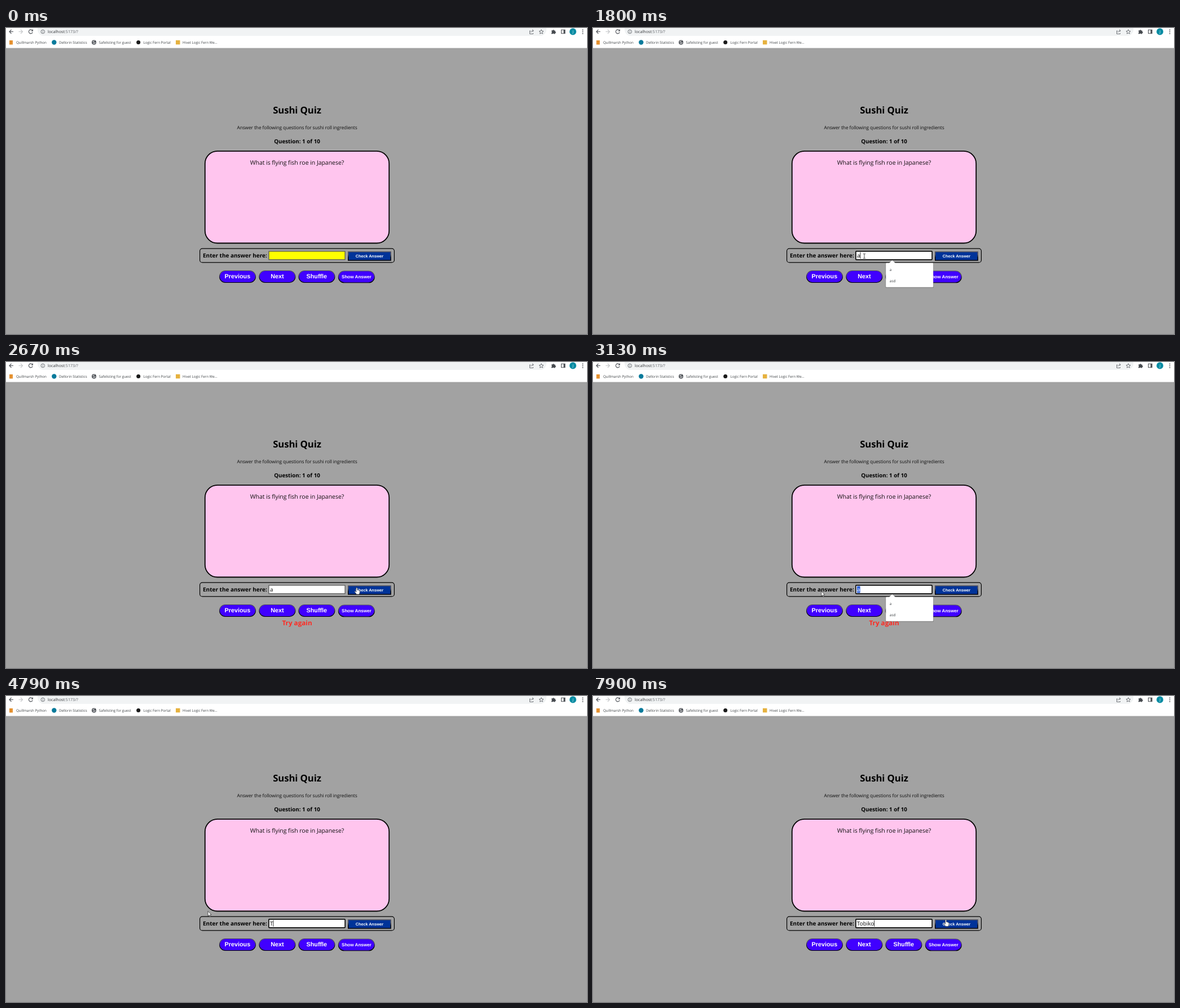
Animation, 1030 px wide and 544 px high, one loop 8000 ms. Source, as an HTML page:

```html
<!DOCTYPE html>
<html lang="en">
<head>
<meta charset="utf-8">
<title>Sushi Quiz</title>
<style>
  html, body { margin: 0; width: 100%; height: 100%; overflow: hidden; background: #a2a2a2; }
  svg { display: block; width: 100%; height: 100%; }
  text { font-family: "Open Sans", "Noto Sans", sans-serif; text-rendering: geometricPrecision; white-space: pre; }
  .mid { text-anchor: middle; }
  .bold { font-weight: 700; }
  .small { font-size: 6.2px; fill: #3c4043; }
  .button { font: 700 10.8px "Liberation Sans", Arial, sans-serif; fill: #fff; text-anchor: middle; }
  .pill { fill: #4000ff; stroke: url(#outset); stroke-width: 1.1; }
  .line { fill: none; stroke: #50545a; stroke-width: 1.1; }
  .field { font-size: 9.9px; }
</style>
</head>
<body>
<svg viewBox="0 0 1030 544">
  <defs>
    <linearGradient id="outset" x2="0" y2="1">
      <stop offset=".3" stop-color="#55535f"/><stop offset=".7" stop-color="#000"/>
    </linearGradient>
  </defs>

  <!-- Browser bar -->
  <rect width="1030" height="35.6" fill="#fff"/>
  <rect x="56" y="-10" width="902" height="24" rx="11" fill="#f1f3f4"/>
  <g class="line">
    <path d="M13 6.5H6M9.5 3 6 6.5 9.5 10"/>
    <path d="M22.500 6.500h7M26 3l3.500 3.500L26 10" stroke="#c4c6c9"/>
    <path d="M46.700 4.300A3.500 3.500 0 1 0 47.200 7.500M47.400 2.600v2.600h-2.600"/>
    <circle cx="65.300" cy="6.500" r="3.300" stroke-width=".8"/>
    <path d="M65.300 6v2.300M65.300 4.400v.8" stroke-width=".8"/>
    <path d="M930 5h-1.500v5.500h6V9M930.500 8c.3-2.400 2-3.200 4.500-3.200M933 2.700l2.300 2.100L933 7" stroke-width=".8"/>
    <path d="M949 2.800l1.100 2.600 2.800.2-2.100 1.900.6 2.700-2.400-1.400-2.400 1.400.6-2.700-2.100-1.900 2.800-.2z" stroke-width=".8"/>
    <path d="M984.500 3.300h6.500v6.400h-6.500z"/>
  </g>
  <path d="M967 4.500h2a1.300 1.300 0 0 1 2.600 0h2v2a1.300 1.300 0 0 1 0 2.600v1.400h-2.300a1.200 1.200 0 0 0-2.300 0h-2V8.400a1.200 1.200 0 0 0 0-2.300zM988.500 3.300h2.500v6.400h-2.500z" fill="#45494e"/>
  <circle cx="1005" cy="6.500" r="6" fill="#078ca3"/>
  <text class="mid" x="1005" y="8.800" font-size="6.500" fill="#fff">J</text>
  <g fill="#45494e">
    <circle cx="1022.500" cy="3.500" r=".9"/><circle cx="1022.500" cy="6.700" r=".9"/><circle cx="1022.500" cy="9.900" r=".9"/>
  </g>
  <text x="74" y="9.200" font-size="7.150" fill="#303236">localhost<tspan fill="#5f6368">:5173/?</tspan></text>

  <rect x="6" y="22" width="6" height="7.500" fill="#e59231"/>
  <circle cx="85.300" cy="25.500" r="4.200" fill="#087a9b"/>
  <circle cx="156" cy="25.500" r="4" fill="#4b4f54"/>
  <path d="M153.500 24.500c2 0 2-1.500 3.500-1.500M154 27c2-.5 3 .5 4.500-1" stroke="#fff" stroke-width="1.100" fill="none"/>
  <circle cx="234.700" cy="25.500" r="3.500" fill="#1a1a1a"/>
  <rect x="301" y="21.800" width="7.500" height="7.500" fill="#e6b23f"/>
  <g class="small">
    <text x="18" y="27.700">Quillmarsh Python</text>
    <text x="94" y="27.700">Dellorin Statistics</text>
    <text x="164.800" y="27.700">Safelisting for guest</text>
    <text x="243.500" y="27.700">Logic Fern Portal</text>
    <text x="313" y="27.700">Hivet Logic Fern We...</text>
  </g>

  <!-- Quiz -->
  <text class="mid bold" x="516" y="152" font-size="16.800" letter-spacing="-.12">Sushi Quiz</text>
  <text class="mid" x="516" y="179.600" font-size="8.400" letter-spacing="-.1" fill="#111">Answer the following questions for sushi roll ingredients</text>
  <text class="mid bold" x="516" y="204.600" font-size="9.800">Question: 1 of 10</text>
  <rect x="352.800" y="218.900" width="326.400" height="163.600" rx="22" fill="#ffc5ee" stroke="#000" stroke-width="1.800"/>
  <text class="mid" x="516" y="243" font-size="10.500" letter-spacing="-.04" fill="#111">What is flying fish roe in Japanese?</text>

  <rect x="343.600" y="392.100" width="344.800" height="24.800" rx="4.500" fill="none" stroke="#000" stroke-width="1.200"/>
  <text class="bold" x="349" y="408" font-size="10">Enter the answer here:</text>
  <rect id="input" x="466" y="397" width="135" height="14.800" stroke="#4a4a4a" stroke-width="1.100"/>
  <rect id="focusRing" x="465.800" y="396.800" width="135.400" height="15.200" rx="1.500" fill="none" stroke="#000" stroke-width="1.400"/>
  <rect id="selection" x="468" y="398.500" width="5.700" height="12" fill="#2f62d9"/>
  <text id="typed" class="field" x="468" y="408"></text>
  <rect id="caret" y="398.500" width=".8" height="11.500"/>

  <rect x="606.700" y="397.900" width="75.400" height="15.200" fill="#003399" stroke="url(#outset)" stroke-width="1.400"/>
  <text class="button" x="644.500" y="408" style="font-size:7.200px">Check Answer</text>

  <rect class="pill" x="378.500" y="431.500" width="64" height="21" rx="10.500"/>
  <rect class="pill" x="448.900" y="431.500" width="64" height="21" rx="10.500"/>
  <rect class="pill" x="518.900" y="431.500" width="64" height="21" rx="10.500"/>
  <rect class="pill" x="589.300" y="432" width="64" height="20.800" rx="10.400"/>
  <text class="button" x="410.400" y="445">Previous</text>
  <text class="button" x="480.900" y="445">Next</text>
  <text class="button" x="550.800" y="445">Shuffle</text>
  <text class="button" x="621.400" y="445" style="font-size:8.100px">Show Answer</text>
  <text id="verdict" class="mid bold" x="516" y="468.300" font-size="11.700" fill="#ff2a22">Try again</text>

  <!-- Suggestions -->
  <g id="menu">
    <rect id="menuShade" x="518.500" y="418" width="85.500" rx="1.500" fill="#000" opacity=".18"/>
    <rect id="menuBox" x="519.200" y="417.800" width="84" rx="1.200" fill="#fff"/>
    <path d="M525 418l5.500-5 5.500 5z" fill="#fff"/>
    <g class="small" style="font-size:6.500px">
      <text x="525.800" y="432">a</text>
      <text x="525.800" y="451.500">asd</text>
      <g id="moreRows"><text x="525.800" y="471">d</text><text x="525.800" y="490.500">sd</text></g>
    </g>
  </g>

  <!-- Pointer -->
  <g id="pointer">
    <circle id="press" r="6.500" fill="#e6dc00" opacity=".62"/>
    <path id="arrow" d="M0 0v8.800l2-1.800 1.400 3 1.300-.6-1.300-2.900h2.800z" fill="#fff" stroke="#222" stroke-width=".7"/>
    <path id="beam" d="M-2-4h1.500L0-3.600.5-4H2M-2 4h1.500L0 3.600.5 4H2M0-3.600v7.200" fill="none" stroke="#222" stroke-width=".8"/>
    <path id="hand" d="M-1 0a1 1 0 0 1 2 0v3.400c.4-.5 1.500-.4 1.700.3.500-.4 1.400-.2 1.500.5.700-.2 1.200.2 1.200.9v2.400c0 1.500-.9 2-.9 3.500H-.6c-.3-1.700-2.200-2.600-3-4.600-.4-1.200.9-1.500 1.500-.6L-1 7z" fill="#fff" stroke="#222" stroke-width=".6"/>
  </g>
</svg>
<script>
const LOOP = 8000, BLINK = 530;
const ui = {};
document.querySelectorAll('[id]').forEach(el => { ui[el.id] = el; });

const typing = [
  [1200, ''], [1800, 'a'], [3860, 't'], [4590, ''], [4790, 'T'], [5110, 'To'],
  [5510, 'Tob'], [5780, 'Tobi'], [6510, 'Tobik'], [6710, 'Tobiko']
];
const pointerPath = [
  [200, 960, 532], [470, 700, 400], [600, 590, 362], [740, 505, 402], [940, 505, 402],
  [1070, 481, 405.5], [1870, 481, 405.5], [2130, 622.5, 402], [2670, 622.5, 402],
  [2870, 490, 405], [3130, 405, 407.5], [3390, 358, 382.5], [7240, 358, 382.5],
  [7450, 430, 345], [7700, 560, 365], [7900, 625.5, 398.5]
];
const menuFade = [
  [1270, 0], [1420, 1], [2220, 1], [2380, 0], [2940, 0], [3060, 1], [3790, 1], [3930, 0]
];

const show = (el, on) => el.setAttribute('visibility', on ? 'visible' : 'hidden');
const within = (t, ...spans) => spans.some(([from, to]) => t >= from && t < to);

// Linear interpolation through [time, ...values] points.
function track(points, t) {
  const next = points.findIndex(p => p[0] > t);
  if (next === 0) return points[0].slice(1);
  if (next < 0) return points[points.length - 1].slice(1);
  const a = points[next - 1], b = points[next];
  const k = (t - a[0]) / (b[0] - a[0]);
  return a.slice(1).map((v, i) => v + (b[i + 1] - v) * k);
}

function drawField(t) {
  const [keyTime, value] = typing.filter(k => k[0] <= t).pop() || [0, ''];
  const focused = within(t, [1200, 2200], [2880, LOOP]);
  const selected = within(t, [2940, 3860]);
  ui.typed.textContent = value;
  ui.typed.setAttribute('fill', selected ? '#fff' : '#111');
  ui.input.setAttribute('fill', value ? '#fff' : '#ff0');
  show(ui.focusRing, focused);
  show(ui.selection, selected);
  show(ui.caret, focused && !selected && Math.floor((t - keyTime) / BLINK) % 2 === 0);
  ui.caret.setAttribute('x', 468 + (value ? ui.typed.getComputedTextLength() : 0));
  show(ui.verdict, within(t, [2340, 3860]));
}

function drawMenu(t) {
  const full = t < 1800;
  ui.menu.setAttribute('opacity', track(menuFade, t)[0]);
  ui.menuBox.setAttribute('height', full ? 82 : 43);
  ui.menuShade.setAttribute('height', full ? 83 : 44);
  show(ui.moreRows, full);
}

function drawPointer(t) {
  const [x, y] = track(pointerPath, t);
  const inRow = y > 397 && y < 413;
  const overInput = inRow && x > 466 && x < 601;
  const overCheck = inRow && x > 606 && x < 682;
  ui.pointer.setAttribute('transform', `translate(${x} ${y})`);
  ui.pointer.setAttribute('display', t < 200 ? 'none' : 'inline');
  show(ui.beam, overInput);
  show(ui.hand, overCheck);
  show(ui.arrow, !overInput && !overCheck);
  show(ui.press, within(t, [1200, 1330], [2200, 2340], [2880, 3060]));
}

const start = performance.now();
function frame() {
  const t = (performance.now() - start) % LOOP;
  drawField(t);
  drawMenu(t);
  drawPointer(t);
  requestAnimationFrame(frame);
}
frame();
</script>
</body>
</html>
```
